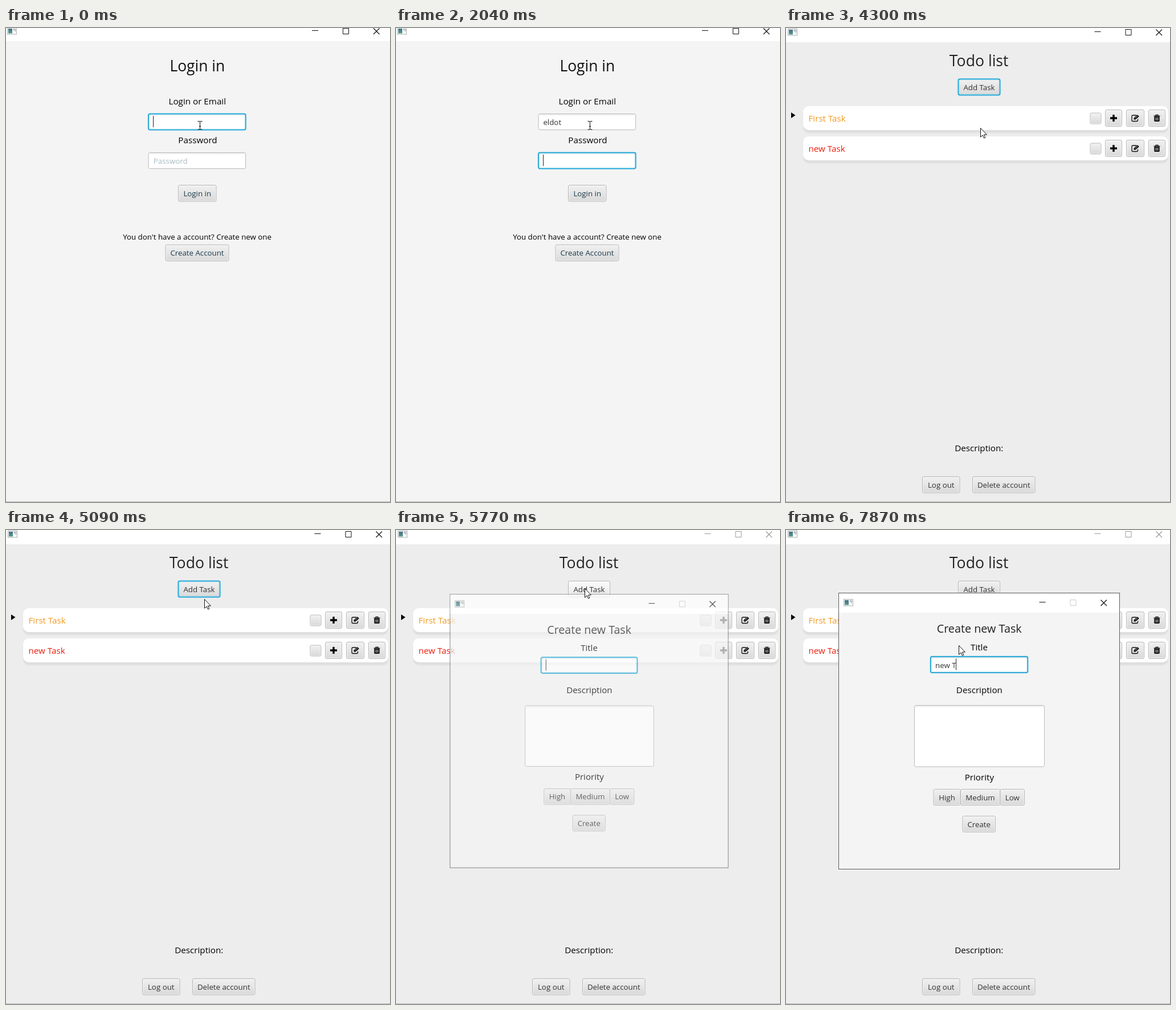
An HTML page that plays this animation: 674 by 831 pixels, repeating every 8000 ms.

```html
<!DOCTYPE html>
<html lang="en">
<head>
<meta charset="utf-8">
<title>Todo app</title>
<style>
  html, body { margin: 0; width: 100%; height: 100%; overflow: hidden; background: #f4f4f4; }
  svg { display: block; width: 674px; height: 831px; }
  text { font-family: "Open Sans", "Noto Sans", sans-serif; white-space: pre; }
  .off { visibility: hidden; }
  .gone { display: none; }
  #dialog { transform-origin: 339px 352.5px; }
</style>
</head>
<body>
<svg id="stage" viewBox="0 0 674 831"></svg>
<script>
const LOOP = 8000, STEP = 68, BLINK = 470;
const LABEL = 15.2, SMALL = 13.3;
const $ = id => document.getElementById(id);

// drawing helpers
const rect = (x, y, w, h, fill, extra = '') =>
  `<rect x="${x}" y="${y}" width="${w}" height="${h}" fill="${fill}" ${extra}/>`;
const inset = (x, y, w, h, d, fill, extra) => rect(x + d, y + d, w - 2 * d, h - 2 * d, fill, extra);

const text = (s, x, y, size = LABEL, fill = '#000', extra = 'text-anchor="middle"') =>
  `<text x="${x}" y="${y}" font-size="${size}" fill="${fill}" ${extra}>${s}</text>`;

const ring = (x, y, w, h, id) => `<g id="${id}" stroke="#039ed3">
  ${inset(x, y, w, h, .75, 'none', 'rx="3" stroke-width="4.6" stroke-opacity=".13"')}
  ${inset(x, y, w, h, .5, 'none', 'rx="2.5" stroke-width="1.5"')}</g>`;

const face = (x, y, w, h, id = '') =>
  inset(x, y, w, h, .5, '#f8f8f8', 'rx="2.5" stroke="#b5b5b5"') +
  inset(x, y, w, h, 1.8, 'url(#face)', `id="${id}" rx="1"`);

const button = (s, x, y, w, h, fill = '#333', id = '') =>
  face(x, y, w, h, id) + (id ? ring(x, y, w, h, id + 'Ring') : '') +
  text(s, x + w / 2, y + h / 2 + 5, SMALL, fill);

const box = (x, y, w, h) => inset(x, y, w, h, .5, '#fff', 'rx="2.5" stroke="#bababa"') +
  rect(x + 1, y + 1, w - 2, 5, 'url(#shade)', 'rx="1.5"');

const field = (x, y, id) => box(x, y, 171.5, 29) + ring(x, y, 171.5, 29, id + 'Ring') +
  text('', x + 8.8, y + 20.2, SMALL, '#333', `id="${id}"`) + rect(0, y + 4, 1, 20, '#222', `id="${id}Caret"`);

const appIcon = (x, y) => `<g transform="translate(${x} ${y})">
  ${rect(.5, .5, 16, 11.5, '#fbfbfb', 'stroke="#a9b0b3"')}
  ${rect(2, 2, 7, 8.5, 'url(#pane)')}${rect(11, 2, 1.4, 3, '#8a9499')}${rect(13.5, 2, 1.4, 5, '#9aa3a8')}</g>`;

// minimise, maximise, close; x and y mark the top left of the cross
const controls = (x, y, id, maxColor = 'currentColor') =>
  `<g id="${id}" color="#111" fill="none" stroke="currentColor">
   <path d="M${x - 108} ${y + 4}h11"/>
   <path d="M${x - 53.5} ${y}h10v10h-10z" stroke="${maxColor}"/>
   <path d="M${x} ${y}l10.5 10.5m0 -10.5l-10.5 10.5" stroke-width="1.15"/></g>`;

const plus = '<path d="M-6 0H6M0 -6V6" stroke="#000" stroke-width="3.4"/>';
const edit = `<path d="M2 -5H-4Q-6 -5 -6 -3V3.5Q-6 5.5 -4 5.5H2.5Q4.5 5.5 4.5 3.5V1.5" fill="none" stroke="#111" stroke-width="1.3"/>
  <path d="M-2.5 2.5V-.3L3.7 -6 6.9 -3.1 .5 2.5Z" fill="#111"/><path d="M-.4 .2L4 -3.9" stroke="#ddd" stroke-width=".8"/>`;
const trash = `<path d="M-5.5 -3.9H5.5M-2 -4V-5.6H2V-4" fill="none" stroke="#111" stroke-width="1.3"/>
  <path d="M-4.7 -3H4.7V4.5Q4.7 6 3.2 6H-3.2Q-4.7 6 -4.7 4.5Z" fill="#111"/>
  <path d="M-2 -1.3V4M0 -1.3V4M2 -1.3V4" stroke="#ccc" stroke-width=".9"/>`;
const iconButton = (x, y, w, icon) =>
  face(x, y, w, 30) + `<g transform="translate(${x + w / 2} ${y + 15})">${icon}</g>`;

const card = (title, y, color) =>
  rect(30, y + 4, 641, 43, '#dedede', 'rx="10" filter="url(#soft)"') +
  rect(30, y, 641, 42, '#fff', 'rx="10"') +
  text(title, 39.5, y + 27, LABEL, color, '') + face(533.5, y + 11.5, 20, 20) +
  iconButton(560, y + 6, 30, plus) + iconButton(597, y + 6, 32, edit) + iconButton(636, y + 6, 30, trash);

const gradient = (id, from, to, alpha = 1) => `<linearGradient id="${id}" x2="0" y2="1">
  <stop stop-color="${from}"/><stop offset="1" stop-color="${to}" stop-opacity="${alpha}"/></linearGradient>`;

const teal = '#1c3b4b';
const defs = `<defs>
  ${gradient('face', '#f0f0f0', '#dadada')}${gradient('hover', '#fafafa', '#e8e8e8')}
  ${gradient('press', '#dedede', '#cccccc')}${gradient('pane', '#3f6f86', '#5b9a8c')}
  ${gradient('shade', '#e8e8e8', '#ffffff', 0)}
  <filter id="soft" x="-5%" y="-30%" width="110%" height="160%"><feGaussianBlur stdDeviation="1"/></filter>
</defs>`;

const login = `<g id="login">
  ${rect(0, 0, 674, 831, '#f4f4f4')}${rect(0, 0, 674, 23, '#fff')}
  ${appIcon(2, -1)}${controls(645, .5, 'loginBar')}
  ${text('Login in', 335.8, 75.5, 26.4, '#111')}
  ${text('Login or Email', 335.8, 134)}${field(249.6, 150, 'user')}
  ${text('Password', 336.5, 202)}${field(249.6, 218, 'pass')}
  ${text('Password', 258.8, 238, SMALL, '#a9bac2', 'id="prompt"')}
  <g id="dots" fill="#2b2b2b">${[0, 1, 2].map(i => `<circle cx="${263.5 + 8 * i}" cy="234" r="3.3"/>`).join('')}</g>
  ${button('Login in', 302, 275, 67.5, 29.5, teal, 'enter')}
  ${text("You don't have a account? Create new one", 335.6, 371, SMALL)}
  ${button('Create Account', 279.5, 379.5, 112, 29.5, teal)}
</g>`;

const dialog = `<g id="dialog">
  ${rect(92.5, 110.5, 493, 484, '#f4f4f4', 'stroke="#5c5c5c"')}${rect(93, 111, 492, 34, '#fff')}
  ${appIcon(101, 121)}${controls(552.5, 122.5, 'dialogBar', '#ccc')}
  ${text('Create new Task', 339.2, 180, 19.8, '#222')}
  ${text('Title', 339, 211)}${field(253.3, 221.5, 'title')}
  ${text('Description', 339.4, 285.5)}${box(225, 307, 229, 108.5)}
  ${text('Priority', 339.4, 438.5)}
  ${button('High', 258.5, 454, 48, 29)}${button('Medium', 306, 454, 70, 29)}${button('Low', 375.5, 454, 43.5, 29)}
  ${button('Create', 309.5, 501, 58.5, 29)}
</g>`;

const todo = `<g id="todo">
  ${rect(0, 0, 674, 831, '#ededed')}${rect(0, 0, 674, 25, '#fff')}
  ${appIcon(3, 1)}${controls(649.5, 2.5, 'todoBar')}
  ${text('Todo list', 338.6, 67, 26.6, '#222')}
  ${button('Add Task', 302, 89, 74, 29, '#333', 'add')}
  <path d="M9 148L16.5 153 9 158Z"/>
  ${card('First Task', 137, '#f39a22')}${card('new Task', 190, '#ee1c0c')}
  ${text('Description:', 338.8, 742)}
  ${button('Log out', 239, 786, 66.5, 29.5)}${button('Delete account', 327, 786, 110.5, 29.5)}
  ${dialog}
</g>`;

$('stage').innerHTML = defs + login + todo + rect(0, 830, 674, 1, '#b9b9b9') + `
  <path id="beam" d="M336.5 163.5H339Q340.5 163.5 340.5 165V176.5Q340.5 178 339 178H336.5M344.5 163.5H342Q340.5 163.5 340.5 165M344.5 178H342Q340.5 178 340.5 176.5M339 172.5H342" fill="none" stroke="#111"/>
  <path id="arrow" d="M.5 .5V16.3L4.2 12.9 6.5 18.1 8.8 17.1 6.5 12H11.4Z" fill="#fff" stroke="#111"/>`;

const show = (id, on) => $(id).classList.toggle('off', !on);
const fill = (id, name) => $(id).setAttribute('fill', `url(#${name})`);
const activate = (id, on) => $(id).setAttribute('color', on ? '#111' : '#999');

// time held between screen refreshes, aligned to the pointer's arrival
const refresh = t => 5090 + Math.floor((t - 5090) / STEP + .05) * STEP;

// fields: focus span and moment of each key press
const inputs = [
  { id: 'user', word: 'eldot', from: 50, to: 2040, keys: [590, 850, 1310, 1510, 1710] },
  { id: 'pass', word: '', from: 2040, to: 3350, keys: [2500, 2760, 3030] },
  { id: 'title', word: 'new T', from: 5720, to: LOOP, keys: [6590, 6860, 6930, 7670, 7870] }
];

function drawInput({ id, word, from, to, keys }, t) {
  const count = keys.filter(k => k <= t).length;
  const focused = t >= from - 50 && t < to;
  const label = $(id);
  label.textContent = word.slice(0, count);
  const width = word ? (count ? label.getComputedTextLength() : 0) : count * 8.3;
  $(id + 'Caret').setAttribute('x', Math.round(+label.getAttribute('x') + width - .2));
  const sinceKey = t - (count ? keys[count - 1] : from);
  show(id + 'Ring', focused);
  show(id + 'Caret', focused && sinceKey % (2 * BLINK) < BLINK);
}

// pointer stops: time, x, y
const stops = [
  [4300, 341, 175], [4480, 345, 212], [4818, 350, 131], [5022, 350, 131],
  [5090, 348, 121], [5362, 331, 102], [5770, 331, 102], [6246, 303, 202]
];

function pointer(t) {
  const i = stops.findIndex(s => s[0] > t);
  if (i < 1) return (i ? stops.at(-1) : stops[0]).slice(1);
  const [t0, x0, y0] = stops[i - 1], [t1, x1, y1] = stops[i];
  const p = (t - t0) / (t1 - t0), e = p * p * (3 - 2 * p);
  return [x0 + (x1 - x0) * e, y0 + (y1 - y0) * e].map(Math.round);
}

function draw(t) {
  $('login').classList.toggle('gone', t >= 4040);
  $('todo').classList.toggle('gone', t < 4040);
  inputs.forEach(input => drawInput(input, t));

  show('prompt', t < 2040);
  [...$('dots').children].forEach((dot, i) => dot.classList.toggle('off', t < inputs[1].keys[i]));
  show('enterRing', t >= 3350);
  fill('enter', t < 3750 ? 'face' : 'press');
  activate('loginBar', t < 3820);

  activate('todoBar', t < 5640);
  show('addRing', t < 5640);
  fill('add', t < 5160 || t >= 5840 ? 'face' : t >= 5430 && t < 5570 ? 'press' : 'hover');

  const open = Math.min(1, Math.max(0, (refresh(t) - 5640) / 180));
  $('dialog').classList.toggle('gone', !open);
  $('dialog').style.transform = `scale(${.965 + .035 * open})`;
  $('dialog').style.opacity = open;

  show('beam', t < 4300);
  show('arrow', t >= 4300);
  $('arrow').setAttribute('transform', `translate(${pointer(refresh(t))})`);
}

const start = performance.now();
function tick() {
  draw((performance.now() - start) % LOOP);
  requestAnimationFrame(tick);
}
tick();
</script>
</body>
</html>
```
